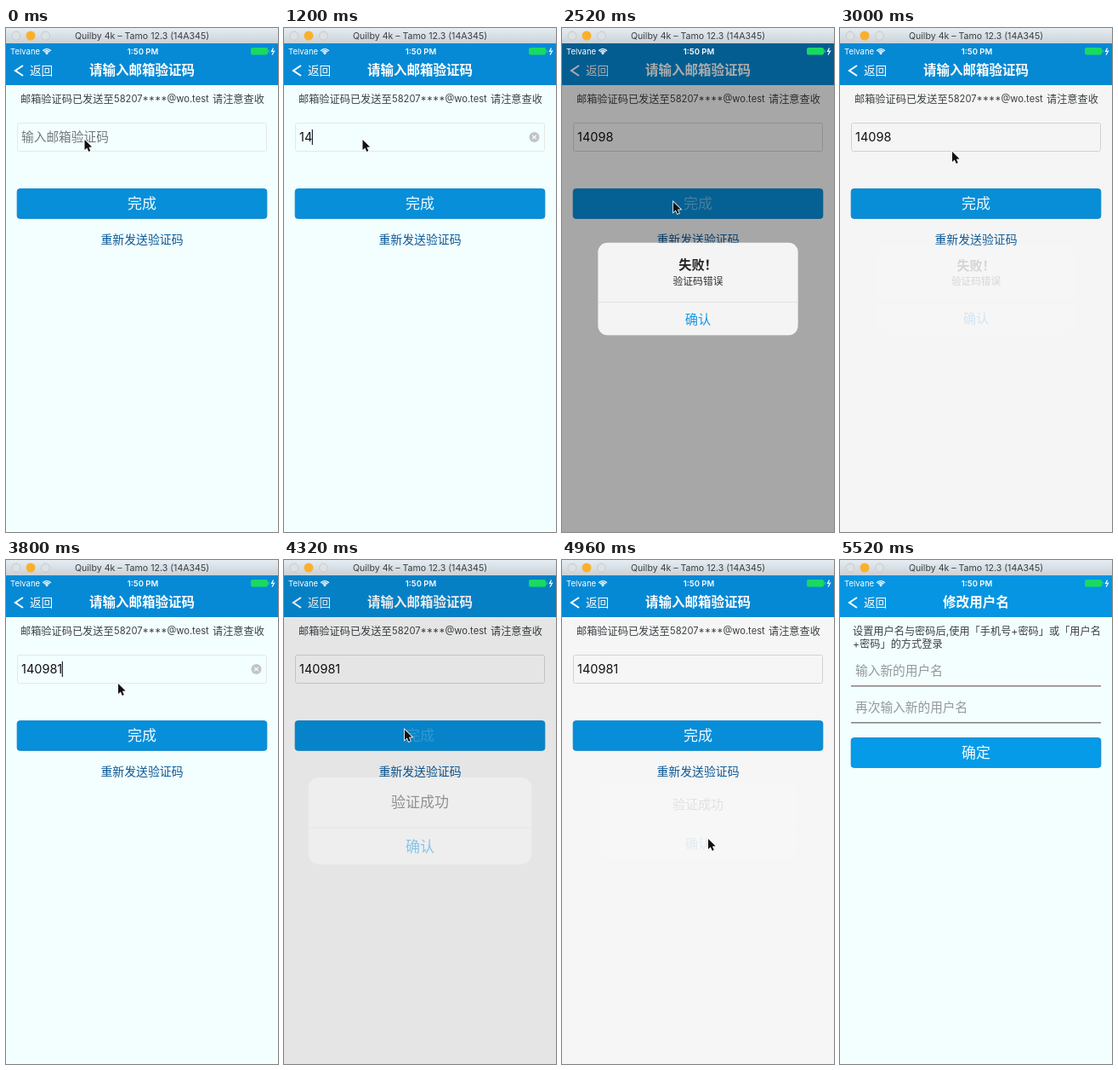
These frames come from a looping animation (320x591 px, 5.6 s). An HTML page with a canvas:

```html
<!DOCTYPE html>
<html lang="zh-CN">
<head>
<meta charset="utf-8">
<style>
html, body { margin: 0; width: 100%; height: 100%; overflow: hidden; background: #f3feff; }
canvas { display: block; width: 320px; height: 591px; }
</style>
</head>
<body>
<canvas id="stage"></canvas>
<script>
const canvas = document.getElementById('stage');
const ctx = canvas.getContext('2d');
const ratio = window.devicePixelRatio || 1;
canvas.width = 320 * ratio;
canvas.height = 591 * ratio;

const LOOP = 5600;
const FONT = "Inter, 'Noto Sans CJK SC', 'Noto Sans CJK JP', 'Noto Sans CJK', sans-serif";
const INK = '#3c4144';
const KEYS = [600, 1000, 1360, 1560, 1800, 3640];
const ALERTS = [
  { open: 2400, close: 2800, title: '失败！', note: '验证码错误', height: 107 },
  { open: 4280, close: 4740, title: '验证成功', height: 90 }
];
const MOVES = [
  { at: 2160, x: 131, y: 204 },
  { at: 2560, x: 156, y: 337 },
  { at: 2800, x: 132, y: 145 },
  { at: 4000, x: 142, y: 199 },
  { at: 4360, x: 172, y: 327 }
];

const progress = (t, start, span) => Math.min(1, Math.max(0, (t - start) / span));
const smooth = u => u * u * (3 - 2 * u);
const easeOut = (u, power) => 1 - (1 - u) ** power;

// cy is the visual middle of the line
function text(s, x, cy, size, color, weight = 400, align = 'left') {
  ctx.font = `${weight} ${size}px ${FONT}`;
  ctx.textAlign = align;
  ctx.fillStyle = color;
  ctx.fillText(s, x, cy + size * 0.37);
}

const centered = (s, cy, size, color, weight) => text(s, 160, cy, size, color, weight, 'center');

function rect(x, y, w, h, color) {
  ctx.fillStyle = color;
  ctx.fillRect(x, y, w, h);
}

function round(x, y, w, h, r, fill, stroke) {
  ctx.beginPath();
  ctx.roundRect(x, y, w, h, r);
  paint(fill, stroke, 1);
}

function disc(x, y, r, fill, stroke) {
  ctx.beginPath();
  ctx.arc(x, y, r, 0, 7);
  paint(fill, stroke, 1);
}

function line(points, color, width) {
  ctx.beginPath();
  points.forEach(([x, y]) => ctx.lineTo(x, y));
  paint(null, color, width);
}

function paint(fill, stroke, width) {
  if (fill) {
    ctx.fillStyle = fill;
    ctx.fill();
  }
  if (stroke) {
    ctx.strokeStyle = stroke;
    ctx.lineWidth = width;
    ctx.stroke();
  }
}

// Draws with an offset and opacity
function layer(dx, dy, alpha, drawing) {
  ctx.save();
  ctx.translate(dx, dy);
  ctx.globalAlpha *= alpha;
  drawing();
  ctx.restore();
}

function button(y, label, color, alpha = 1) {
  round(13.2, y - 17.3, 293.6, 34.6, 3, color, '#0a84c8');
  layer(0, 0, alpha, () => centered(label, y, 17, '#f2fcff'));
}

function codeField(t, border) {
  round(13.5, 111.5, 293, 33, 2, null, border);
  const value = '140981'.slice(0, KEYS.filter(key => t >= key).length);
  if (value) text(value, 18, 127.3, 14.5, '#111');
  else text('输入邮箱验证码', 18, 127.5, 14.7, '#747a7d');

  const focused = (t >= 200 && t < 2320) || (t >= 3440 && t < 4200);
  if (!focused) return;
  ctx.font = `400 14.5px ${FONT}`;
  rect(17.5 + ctx.measureText(value).width, 119, 1.2, 18, '#223');
  if (!value) return;
  layer(294.5, 128, 1, () => {
    disc(0, 0, 6, '#c1c5c7');
    line([[-2.2, -2.2], [2.2, 2.2]], '#fff', 1.2);
    line([[2.2, -2.2], [-2.2, 2.2]], '#fff', 1.2);
  });
}

function codePage(t, dimmed) {
  rect(0, 67, 320, 524, dimmed ? '#f7f7f7' : '#f3feff');
  text('邮箱验证码已发送至', 17, 83, 12.2, INK);
  text('58207****@wo.test', 127, 83, 11.2, INK);
  text('请注意查收', 243, 83, 12.2, INK);
  codeField(t, dimmed ? '#d3d3d3' : '#e8e6e4');

  const last = ALERTS.filter(({ open }) => t >= open - 80).pop();
  const label = last ? 0.2 + 0.8 * smooth(progress(t, last.open + 40, 240)) : 1;
  button(206, '完成', '#088fd9', label);
  centered('重新发送验证码', 248, 13.9, '#0d5a97');
}

function namePage() {
  rect(0, 67, 320, 524, '#f3feff');
  text('设置用户名与密码后,使用「手机号+密码」或「用户名', 15, 83.5, 12.2, INK);
  text('+密码」的方式登录', 15, 98, 12.2, INK);
  ['输入新的用户名', '再次输入新的用户名'].forEach((hint, i) => {
    text(hint, 18, 129.5 + 43.5 * i, 14.7, '#949899');
    rect(13, 147 + 43 * i, 294, 1.5, '#857f7f');
  });
  button(226, '确定', '#059be8');
}

function navBar(push) {
  rect(0, 18, 320, 49, push ? '#0595e2' : '#068ad5');
  line([[20, 44], [11, 50], [20, 56]], '#fff', 2.1);
  text('返回', 28, 50, 13.6, '#fff', 500);
  layer(-90 * push, 0, 1 - push, () => centered('请输入邮箱验证码', 49, 15.5, '#fff', 700));
  layer(120 * (1 - push), 0, push, () => centered('修改用户名', 49, 15.6, '#fff', 700));
}

function statusBar() {
  text('Telvane', 5, 27.2, 9.5, '#fff');
  for (let r = 2.2; r < 7; r += 2.1) {
    ctx.beginPath();
    ctx.arc(48, 31, r, -Math.PI * 0.77, -Math.PI * 0.23);
    paint(null, '#fff', 1.4);
  }
  disc(48, 30.3, 0.9, '#fff');
  text('1:50 PM', 161, 27.2, 9.5, '#fff', 600, 'center');
  round(288, 23, 20, 8.5, 2, '#19d962');
  rect(308.5, 25.5, 1.3, 3.5, '#19d962');
  line([[314.5, 23.5], [312.5, 27.5], [315.5, 27], [313, 31.5]], '#fff', 1.2);
}

function titleBar() {
  const shade = ctx.createLinearGradient(0, 0, 0, 18);
  shade.addColorStop(0, '#e6edf2');
  shade.addColorStop(1, '#c9d2d9');
  rect(0, 0, 320, 18, shade);
  disc(12, 9, 5, '#dce1e4', '#cdcac9');
  disc(29, 9, 5.5, '#fbb02c');
  disc(46.5, 9, 5, '#dce1e4', '#cdcac9');
  centered('Quilby 4k – Tamo 12.3 (14A345)', 9, 10.6, '#3b3e40');
}

const alertAlpha = (t, { open, close }) => t < close
  ? easeOut(progress(t, open, 160), 2)
  : (1 - progress(t, close, 280)) ** 1.5;

function alertBox(t, box) {
  const { open, title, note, height } = box;
  const scale = 1.24 - 0.24 * easeOut(progress(t, open, 160), 2);
  layer(160, 306, alertAlpha(t, box), () => {
    ctx.scale(scale, scale);
    round(-116, -height / 2, 232, height, 11, '#f9f9f9');
    const split = height / 2 - 38.5;
    rect(-116, split, 232, 0.8, '#d8dcde');
    ctx.translate(-160, 0);
    centered(title, note ? -28 : -19.5, 15, '#1a1a1a', note ? 700 : 500);
    if (note) centered(note, -9.5, 11.6, '#222');
    centered('确认', split + 19.5, 15, '#0a90e2', 500);
  });
}

function pointer(t) {
  let x = 92.5, y = 131;
  for (const move of MOVES) {
    const u = smooth(progress(t, move.at, 200));
    x += (move.x - x) * u;
    y += (move.y - y) * u;
  }
  layer(x, y, 1, () => {
    ctx.beginPath();
    [[0, 0], [0, 12], [2.8, 9.4], [4.8, 14], [6.8, 13.1], [4.9, 8.7], [8.6, 8.6]]
      .forEach(([px, py]) => ctx.lineTo(px, py));
    ctx.closePath();
    paint(null, '#fff', 1.6);
    paint('#111');
  });
}

function draw(t) {
  const dim = 0.37 * Math.max(...ALERTS.map(box => alertAlpha(t, box) ** 2 * (t >= box.open)));
  const push = easeOut(progress(t, 5160, 360), 3);

  ctx.setTransform(ratio, 0, 0, ratio, 0, 0);
  layer(-96 * push, 0, 1, () => codePage(t, dim > 0));
  if (push) {
    rect(0, 67, 320, 524, `rgba(0,0,0,${0.1 * push})`);
    layer(320 * (1 - push), 0, 1, namePage);
  }
  navBar(push);
  rect(0, 18, 320, 573, `rgba(0,0,0,${dim})`);
  statusBar();
  ALERTS.forEach(box => alertBox(t, box));
  titleBar();
  if (t < 5200) pointer(t);
}

const start = performance.now();
function tick() {
  draw((performance.now() - start) % LOOP);
  requestAnimationFrame(tick);
}
tick();
</script>
</body>
</html>
```
